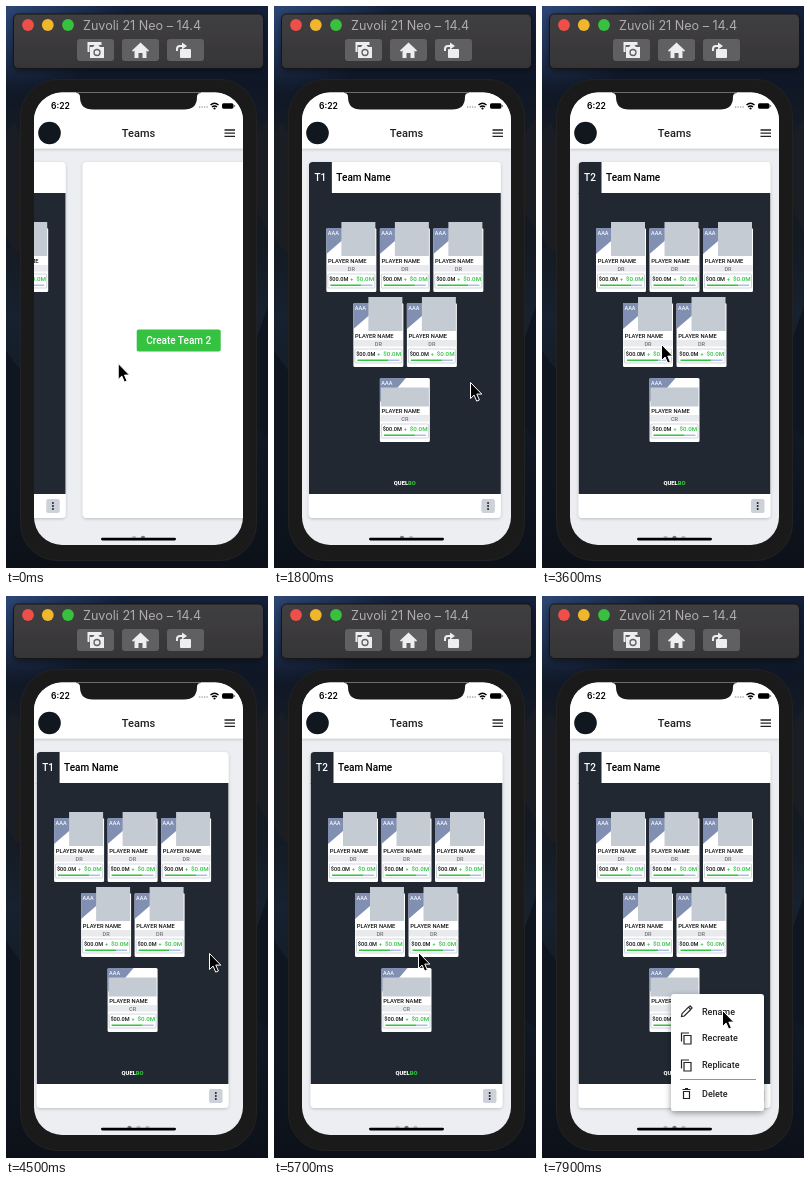
Recreate the animation shown at these times as an HTML page. Size 262x562 px, loop 8000 ms.

```html
<!DOCTYPE html>
<html lang="en">
<head>
<meta charset="utf-8">
<title>Team carousel</title>
<style>
html, body { margin: 0; width: 100%; height: 100%; overflow: hidden; background: #0e131a; }
svg { display: block; width: 262px; height: 562px; }
text { font-family: Roboto, Arial, sans-serif; font-weight: 500; }
.title { font: 12.6px Inter, Arial, sans-serif; }
.clock { font: 600 8.6px Inter, Arial, sans-serif; }
.line { fill: none; stroke: #222; stroke-width: 1.2; }
</style>
</head>
<body>
<svg viewBox="0 0 262 562">
  <defs>
    <linearGradient id="sky" x2="0" y2="1">
      <stop offset="0" stop-color="#14203a"/>
      <stop offset=".14" stop-color="#0f1726"/>
      <stop offset=".24" stop-color="#171c24"/>
      <stop offset=".42" stop-color="#141a22"/>
      <stop offset=".55" stop-color="#17212f"/>
      <stop offset=".75" stop-color="#111924"/>
      <stop offset="1" stop-color="#0c1119"/>
    </linearGradient>
    <radialGradient id="glow" cx="0" cy="0" r="1">
      <stop offset="0" stop-color="#2c4674"/>
      <stop offset="1" stop-color="#2c4674" stop-opacity="0"/>
    </radialGradient>
    <linearGradient id="bar" x2="0" y2="1">
      <stop offset="0" stop-color="#403f41"/>
      <stop offset="1" stop-color="#363537"/>
    </linearGradient>
    <filter id="soft" x="-20%" y="-20%" width="140%" height="140%">
      <feDropShadow dx="0" dy="1" stdDeviation="1.5" flood-opacity=".2"/>
    </filter>
    <filter id="deep" x="-20%" y="-20%" width="140%" height="140%">
      <feDropShadow dx="0" dy="2" stdDeviation="3" flood-opacity=".4"/>
    </filter>
    <clipPath id="screen"><rect x="28" y="86.500" width="209" height="452.500" rx="28"/></clipPath>
    <clipPath id="round"><rect x="-.5" y="156" width="192" height="356" rx="4"/></clipPath>
  </defs>

  <!-- desktop -->
  <rect width="262" height="562" fill="url(#sky)"/>
  <rect width="120" height="90" fill="url(#glow)"/>
  <path d="M0 128l8-12 10 18v104l-10 6-8-14zM262 112l-14 20v70l14 22z" fill="#1a1e24"/>
  <path d="M0 345l16 22v90l-16 20zM262 300l-14 40v80l14 12z" fill="#10161f"/>

  <!-- simulator window -->
  <rect x="7.500" y="8" width="250" height="54.500" rx="5" fill="url(#bar)" stroke="#151517" filter="url(#deep)"/>
  <circle cx="22" cy="19" r="5.900" fill="#ee4f48"/>
  <circle cx="41.800" cy="19" r="5.900" fill="#f0b62c"/>
  <circle cx="62" cy="19" r="5.900" fill="#38c03f"/>
  <text class="title" x="77" y="24" fill="#aeacae">Zuvoli 21 Neo – 14.4</text>
  <g fill="#605f61">
    <rect x="71" y="33" width="37" height="22" rx="3"/>
    <rect x="116" y="33" width="37" height="22" rx="3"/>
    <rect x="161" y="33" width="37" height="22" rx="3"/>
  </g>
  <g fill="#eee">
    <path d="M81.500 36h14v3h-12v7h-2z"/>
    <path d="M84 41h3l1.500-2h4l1.500 2h4v11H84z"/>
    <path d="M126 44.500l8.500-8 8.500 8-1 1.200-1.500-1.200V52h-4v-5h-4v5h-4v-7.500l-1.500 1.200z"/>
    <rect x="174" y="43" width="11" height="9" rx="1"/>
    <path d="M170 45v-2q0-4 4-4h2v-2.500l5 3.500-5 3.500V41h-2q-2 0-2 2v2z"/>
  </g>
  <circle cx="91" cy="46.500" r="3" fill="#eee" stroke="#605f61" stroke-width="1.300"/>

  <!-- phone body -->
  <path d="M10 139h6v19h-6zM10 175h6v33h-6zM10 213h6v33h-6zM249 175h5v33h-5z" fill="#1d1d1f"/>
  <rect x="14.500" y="73.500" width="236" height="481" rx="37" fill="#1a1a1b" stroke="#222224"/>

  <g clip-path="url(#screen)">
    <rect x="28" y="86" width="209" height="453" fill="#edeef2"/>
    <g id="pages"></g>
    <g id="dots"></g>
    <rect x="28" y="80" width="209" height="62.500" fill="#fff" filter="url(#soft)"/>
    <text class="clock" x="45" y="103">6:22</text>
    <path d="M193 101h9" stroke="#aaa" stroke-width="1.300" stroke-dasharray="1.300 1.200"/>
    <path d="M204.500 99q4-3.600 8 0M206 101q2.500-2.200 5 0" fill="none" stroke="#000" stroke-width="1.400"/>
    <circle cx="208.500" cy="102.500" r="1.100"/>
    <rect x="216" y="97.300" width="11.500" height="5.400" rx="1.600"/>
    <path d="M228.600 99v2" stroke="#777"/>
    <circle cx="43.500" cy="127" r="11.300" fill="#10171f"/>
    <text x="132.500" y="131" font-size="11" text-anchor="middle" fill="#222">Teams</text>
    <path d="M218.500 124h10.500M218.500 127.200h10.500M218.500 130.400h10.500" stroke="#222" stroke-width="1.300"/>
    <path d="M70 86h125v1q-4 0-4 4 0 12.500-13 12.500H87q-13 0-13-12.500 0-4-4-4z" fill="#1a1a1b"/>
    <g id="menu"></g>
    <rect x="95" y="531.700" width="75" height="2.800" rx="1.400"/>
  </g>
  <path id="cursor" d="M0 0v16l3.600-3.400 2.600 6 2.700-1.100-2.600-5.900h5z" stroke="#fff"/>
</svg>
<script>
const $ = id => document.getElementById(id);
const PITCH = 209, LOOP = 8000, CREATED = 3500, MENU = 6650;

const text = (x, y, size, fill, str, extra = '') =>
  `<text x="${x}" y="${y}" font-size="${size}" fill="${fill}" ${extra}>${str}</text>`;
const rect = (x, y, w, h, fill, extra = '') =>
  `<rect x="${x}" y="${y}" width="${w}" height="${h}" fill="${fill}" ${extra}/>`;
const MID = 'text-anchor="middle"';

function player(x, y, role) {
  const wide = role === 'CR';
  return `<g transform="translate(${x} ${y})">` +
    rect(0, 0, 50, 64, '#fff', 'rx="1.500"') +
    `<path d="M0 1q0-1 1-1h${wide ? 25 : 22}L${wide ? '14 14 0 24' : '15 13 0 26'}z" fill="#8190b2"/>` +
    (wide ? rect(1, 9.5, 48, 19, '#c5cbd3') : rect(15, -6, 34, 34, '#c5cbd3')) +
    text(1.5, 7, 5.5, '#fff', 'AAA') +
    text(1.7, 35, 5.8, '#111', 'PLAYER NAME') +
    rect(0.5, 37, 49, 6.5, '#e8eaee') +
    text(25, 42.6, 5.6, '#777', role, MID) +
    rect(1.5, 46, 47, 14, '#fff', 'rx="1" stroke="#bcc4d0" stroke-width=".7"') +
    text(2.8, 53.3, 5.6, '#111', '$00.0M') +
    text(24, 53.3, 5.4, '#2fc344', '+') +
    text(47.7, 53.3, 6.2, '#2fc344', '$0.0M', 'text-anchor="end"') +
    rect(4, 56.5, 31, 1.5, '#35c240') + rect(35, 56.5, 11, 1.5, '#a9bfe0') + '</g>';
}

const sheet = rect(-0.5, 156, 192, 356, '#fff', 'rx="4" filter="url(#soft)"');

const team = n => sheet + '<g clip-path="url(#round)">' +
  rect(-0.5, 156, 23, 32, '#212831') + rect(-0.5, 187, 192, 301, '#212831') + '</g>' +
  text(11, 175, 10, '#fff', 'T' + n, MID) +
  text(27, 175, 10, '#000', 'Team Name') +
  [17, 70.5, 124].map(x => player(x, 222, 'DR')).join('') +
  [44, 97.5].map(x => player(x, 297, 'DR')).join('') +
  player(70.5, 372, 'CR') +
  text(95.5, 479, 5.8, '#fff', 'QUEL<tspan fill="#35c240">BO</tspan>', MID + ' style="font-weight:900"') +
  rect(172, 493, 13.5, 14, '#cdd2da', 'rx="2"') +
  [497, 500, 503].map(y => `<circle cx="178.700" cy="${y}" r="1" fill="#222"/>`).join('');

const empty = n => sheet +
  rect(53.5, 323.5, 84, 22, '#35c240', 'rx="2"') +
  text(95.5, 338, 10, '#fff', 'Create Team ' + n, MID);

const page = (i, body, id = '') => `<g id="${id}" transform="translate(${37 + i * PITCH})">${body}</g>`;
$('pages').innerHTML = page(0, team(1)) + page(1, empty(2), 'before') +
  `<g id="after">${page(1, team(2)) + page(2, empty(3))}</g>`;

const copy = 'M-5 3.500v-8.500h7.500M-2.500-2.500h7v8.500h-7z';
const items = [
  ['Rename', 415.5, 'M-5 5l.5-2.800 6.500-6.500 2.300 2.300-6.500 6.500zM2.500-5l1.200-.5 1.800 1.800-.5 1.200'],
  ['Recreate', 442, copy],
  ['Replicate', 469, copy],
  ['Delete', 497.5, 'M-4-4h8M-1.500-5h3M-3-2h6v7h-6z']
];
$('menu').innerHTML = rect(129, 398, 93, 117, '#fff', 'rx="3" filter="url(#deep)"') +
  items.map(([label, y, d]) => text(160, y + 3.3, 9, '#222', label) +
    `<path class="line" transform="translate(144.500 ${y})" d="${d}"/>`).join('') +
  rect(138, 483, 76, 0.9, '#888');

const smooth = u => u * u * (3 - 2 * u);
const out = u => 1 - (1 - u) ** 3;

// Keys are [time, value, easing into this key]
function track(keys, t) {
  const i = keys.findIndex(k => k[0] > t);
  if (i < 0) return keys[keys.length - 1][1];
  const [t0, a] = keys[i - 1], [t1, b, ease = smooth] = keys[i];
  return a + (b - a) * ease((t - t0) / (t1 - t0));
}

const scroll = [[0, 168.5], [750, 240.5, out], [950, 240.5], [1400, 82], [1950, 0, out],
  [2050, 0], [2450, 137], [2900, PITCH, out], [3850, PITCH], [4200, 85], [4711, 0, out],
  [4760, 0], [5100, 114], [5550, PITCH, out]];
const cursorX = [[0, 112.5], [750, 38.5, out], [950, 38.5], [1400, 196.5], [2050, 196.5],
  [2450, 60], [2700, 60], [3250, 119.5], [3600, 119.5], [3850, 80], [4200, 203.5],
  [4760, 203.5], [5100, 90], [5300, 90], [5650, 144.5], [5750, 144.5], [6350, 215],
  [6850, 215], [7500, 180.5]];
const cursorY = [[0, 357.5], [750, 352.5, out], [950, 352.5], [1400, 376.5], [2050, 376.5],
  [2450, 368], [2700, 368], [3250, 338.5], [3600, 338.5], [3850, 350], [4200, 357.5],
  [5300, 357.5], [5650, 356.5], [5750, 356.5], [6350, 499], [6850, 499], [7500, 414.5]];

function draw(now) {
  const t = now % LOOP, s = track(scroll, t), made = t >= CREATED;
  $('pages').setAttribute('transform', `translate(${-s})`);
  $('before').style.display = made ? 'none' : '';
  $('after').style.display = made ? '' : 'none';

  const count = made ? 3 : 2, active = Math.round(s / PITCH);
  $('dots').innerHTML = Array.from({ length: count }, (_, i) =>
    `<circle cx="${132.5 + (i - (count - 1) / 2) * 9}" cy="532" r="2.200" fill="${i === active ? '#777' : '#bbb'}"/>`).join('');

  const open = out(Math.min(1, Math.max(0, (t - MENU) / 220))), k = 0.8 + 0.2 * open;
  $('menu').style.opacity = open;
  $('menu').setAttribute('transform', `translate(222 515) scale(${k}) translate(-222 -515)`);
  $('cursor').setAttribute('transform', `translate(${track(cursorX, t)} ${track(cursorY, t)})`);
}

const start = performance.now();
function tick() {
  draw(performance.now() - start);
  requestAnimationFrame(tick);
}
tick();
</script>
</body>
</html>
```
